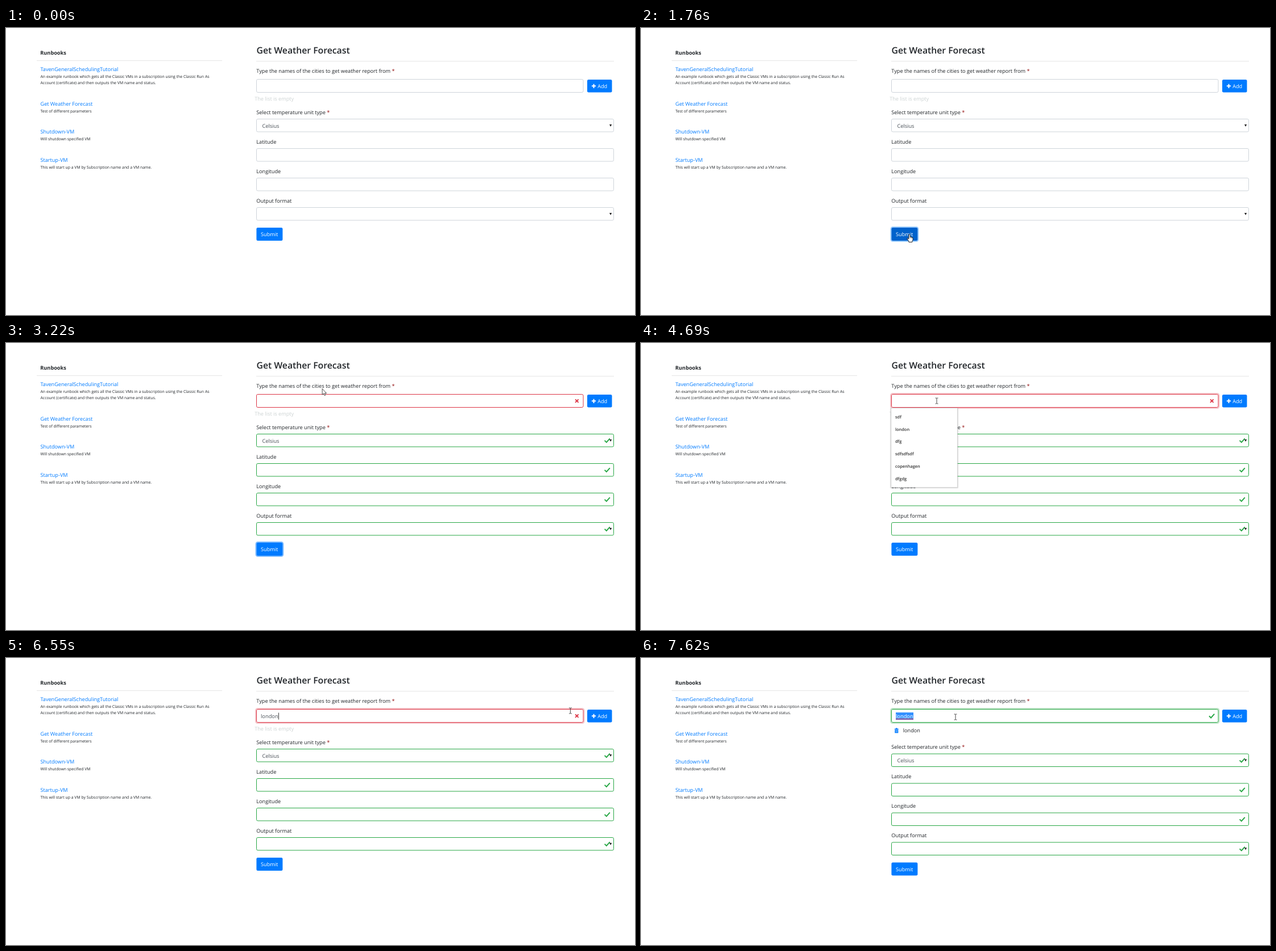
These frames come from a looping animation (1106x506 px, 8 s). An HTML page:

```html
<!DOCTYPE html>
<html lang="en">
<head>
<meta charset="utf-8">
<title>Runbook form</title>
<style>
html, body { margin: 0; width: 100%; height: 100%; overflow: hidden; background: #fff; }
svg { display: block; }
text { font: 9.17px "Open Sans", "Noto Sans", sans-serif; fill: #212529; text-rendering: geometricPrecision; white-space: pre; }
text.title { font-size: 15.75px; font-weight: 600; }
text.head { font-weight: 700; }
text.link { fill: #007bff; font-size: 9.13px; }
text.small { font-size: 6.91px; }
text.value { fill: #495057; }
text.on { fill: #fff; }
text.item { font-size: 7.4px; font-weight: 600; fill: #333; }
.req { fill: #961212; }
.rule { stroke: #e6e6e6; }
.box { fill: #fff; }
.ring { fill: none; stroke-width: 2; }
.tick { fill: none; stroke: #28a745; stroke-width: 2; }
</style>
</head>
<body>
<svg width="1106" height="506" viewBox="0 0 1106 506">
  <path class="rule" d="M54 57.5H380M440 58.5H1069"/>
  <g id="side"></g>
  <text class="title" x="440.5" y="45.3">Get Weather Forecast</text>
  <text x="440.3" y="79.2">Type the names of the cities to get weather report from <tspan class="req">*</tspan></text>

  <rect id="cityRing" class="ring" x="439" y="89" width="577.5" height="26" rx="3.5"/>
  <rect id="city" class="box" x="440.5" y="90.5" width="574.5" height="23" rx="2.3"/>
  <rect id="mark" x="448" y="96" width="31" height="13" fill="#3390ff"/>
  <text id="typed" class="value" x="448" y="106" style="font-size:9.3px"></text>
  <path id="spell" d="M448 107.6H479" stroke="#e0374f" stroke-width="1.1"/>
  <path id="caret" stroke="#222" stroke-width=".9"/>
  <path id="cross" d="M1001 99.3l5.6 5.6m0-5.6l-5.6 5.6" stroke="#dc3545" stroke-width="1.9"/>
  <path id="cityTick" class="tick" d="M999 102.3l3.2 3.2 6-6.8"/>

  <rect id="addRing" class="ring" stroke="#007bff" x="1021" y="90" width="45.5" height="24.5" rx="3.3"/>
  <rect id="add" x="1022" y="91" width="43.5" height="22.5" rx="2.3"/>
  <path d="M1033.5 98.7v7.2m-3.6-3.6h7.2" stroke="#fff" stroke-width="2"/>
  <text class="on" x="1040.2" y="106">Add</text>

  <text id="empty" x="437.2" y="127.7" style="fill:#cdd3d3">The list is empty</text>
  <g id="entry">
    <path d="M445.8 124.8h7v1.2h-7zM447.8 123.5h3v1.3h-3zM446.3 126.6h6v5.6h-6z" fill="#007bff"/>
    <path d="M448 127.7v3.4m1.3-3.4v3.4m1.3-3.4v3.4" stroke="#cfe5ff" stroke-width=".5"/>
    <text x="460.7" y="130.8">london</text>
  </g>

  <g id="lower">
    <g id="fields"></g>
    <rect id="sendRing" class="ring" stroke="#007bff" x="439.5" y="351" width="47.8" height="25" rx="3.3"/>
    <rect id="send" x="440.4" y="352" width="46" height="23" rx="2.3"/>
    <text class="on" x="448" y="367">Submit</text>
  </g>

  <g id="menu"></g>

  <g id="arrow"><path d="M0 0V10.6L2.4 8.4 4.1 12 5.8 11.2 4.2 7.8H7.4Z" fill="#fff" stroke="#222" stroke-width=".8"/></g>
  <g id="hand">
    <path d="M-1.2 8.6V1Q0-.7 1.1 1V4.6Q2.4 3.8 3 5.2 4.2 4.6 4.7 5.8 6 5.4 6.1 7V10L4.9 12.4V14H-1.1V12.5L-4 8.5Q-4.2 6.8-2.7 7.3Z" fill="#fff" stroke="#111" stroke-width=".9"/>
    <path d="M1.1 4.6V7M3 5.2V7.2M4.7 5.8V7.4" stroke="#111" stroke-width=".6"/>
  </g>
  <g id="beam"><path d="M-2.4-5H-.6L0-4.4.6-5H2.4M0-4.4V4.4M-2.4 5H-.6L0 4.4.6 5H2.4" fill="none" stroke="#333" stroke-width=".9"/></g>
</svg>
<script>
const $ = id => document.getElementById(id);
const LOOP = 8000, STEP = 77.13, START = 370;
const BLUE = [0, 123, 255], HOVER = [0, 105, 217], DOWN = [0, 98, 204];
const GREY = [206, 212, 218], RED = [220, 53, 69], GREEN = [40, 167, 69];

const line = (cls, x, y, s) => `<text class="${cls}" x="${x}" y="${y}">${s}</text>`;
const rgb = c => `rgb(${c.map(Math.round)})`;
const mix = (a, b, k) => a.map((v, i) => v + (b[i] - v) * k);
const show = (id, on) => { $(id).style.display = on ? '' : 'none'; };
const within = (t, a, b) => t >= a && t < b;
const ramp = (t, from) => Math.max(0, Math.min(1, (t - from) / 150));

$('side').innerHTML = line('head', 60.3, 46.6, 'Runbooks') + [
  [76, 'TavenGeneralSchedulingTutorial',
    'An example runbook which gets all the Classic VMs in a subscription using the Classic Run As',
    'Account (certificate) and then outputs the VM name and status.'],
  [136.5, 'Get Weather Forecast', 'Test of different parameters'],
  [186, 'Shutdown-VM', 'Will shutdown specified VM'],
  [235.6, 'Startup-VM', 'This will start up a VM by Subscription name and a VM name.']
].map(([y, name, ...notes]) => line('link', 60.5, y, name) +
  notes.map((s, i) => line('small', 60.5, y + 12.1 + 10.9 * i, s)).join('')).join('');

$('fields').innerHTML = [
  ['Select temperature unit type <tspan class="req">*</tspan>', true, 'Celsius'],
  ['Latitude'], ['Longitude'], ['Output format', true]
].map(([label, pick, value], i) => {
  const y = 160.5 + 52 * i;
  return line('', 440.3, y - 8.8, label) +
    `<rect class="box field" x="440.5" y="${y}" width="628" height="22.5" rx="2.3"/>` +
    (value ? line('value', 450.5, y + 15.4, value) : '') +
    `<path class="tick valid" d="M1052.6 ${y + 11.4}l3.2 3.2 6-6.8"/>` +
    (pick ? `<path d="M1061 ${y + 9.4}h4.2l-2.1 4z" fill="#222"/>` : '');
}).join('');

function drawMenu(items) {
  const h = 9.3 + 21.75 * items.length;
  const frame = (grow, opacity) =>
    `<rect x="${439.5 - grow}" y="${115 - grow / 2}" width="${117 + 2 * grow}" height="${h + 1.5 * grow}" rx="${grow}" opacity="${opacity}"/>`;
  return frame(2, .05) + frame(1.2, .08) +
    `<rect x="439.8" y="114.8" width="116.5" height="${h}" fill="#fff" stroke="#c9c9c9" stroke-width=".7"/>` +
    items.map((s, i) => line('item', 447, 132.8 + 21.75 * i, s)).join('');
}
const words = ['sdf', 'london', 'dfg', 'sdfsdfsdf', 'copenhagen', 'dfgdg'];
const menus = { all: drawMenu(words), one: drawMenu(['london']) };
let menuNow = '';

// pointer waypoints: time, x, y
const route = [
  [370, 946, 475], [600, 765, 412], [830, 585, 377], [990, 503, 368], [1140, 475, 364.5], [1220, 472, 363.5],
  [2690, 472, 363.5], [2760, 482, 352], [2912, 575, 262], [3064, 627, 150], [3150, 598, 92], [3220, 556.5, 80.3],
  [3370, 540, 93], [3520, 524, 101], [3750, 520, 102],
  [6020, 520, 102], [6170, 590, 96], [6320, 790, 84], [6480, 960, 88], [6620, 1035, 99.5],
  [6870, 1035, 99.5], [7010, 960, 84], [7160, 780, 83], [7300, 610, 97], [7390, 558, 103], [7470, 553, 104]
];
function pointer(t) {
  const i = route.findIndex(p => p[0] > t);
  if (i < 0) return route[route.length - 1].slice(1);
  if (!i) return route[0].slice(1);
  const [a, b] = [route[i - 1], route[i]];
  return mix(a, b, (t - a[0]) / (b[0] - a[0])).slice(1);
}

// keystroke times and the caret place after each letter
const keys = [4920, 5160, 5320, 5395, 5470, 5630];
const ends = [448.6, 450.8, 456.6, 462.4, 468.2, 473.8, 479.4];

function paintButton(id, hot, down, ring) {
  $(id).setAttribute('fill', rgb(down ? DOWN : hot ? HOVER : BLUE));
  $(id + 'Ring').setAttribute('opacity', ring * .5);
}

function render(t) {
  const k = Math.floor((t - START + 5) / STEP);
  const s = k < 0 ? 0 : START + k * STEP;
  const checked = t >= 1830, added = t >= 6775, focus = within(t, 4140, 6690);
  const shift = added ? 8.5 : 0;
  const [x, y] = pointer(s);
  const over = (l, top, r, bottom) => k >= 0 && x >= l && x <= r && y >= top && y <= bottom;

  const onSend = over(440, 352 + shift, 487, 375 + shift);
  const onAdd = over(1022, 91, 1066, 114);
  const onText = over(440, 90, 1015, 114) || over(440, 212, 1069, 235) || over(440, 264, 1069, 287);
  const kind = onSend || onAdd ? 'hand' : onText ? 'beam' : 'arrow';
  for (const id of ['arrow', 'hand', 'beam']) show(id, k >= 0 && id === kind);
  $(kind).setAttribute('transform', `translate(${x} ${y})`);

  paintButton('send', onSend, within(t, 1680, 1830), ramp(s, 1640) - ramp(s, 4100));
  paintButton('add', onAdd, within(t, 6690, 6845), ramp(s, 6630) - ramp(s, 7420));

  const valid = ramp(s, 1760), fixed = ramp(s, 6765);
  const edge = rgb(mix(mix(GREY, RED, valid), GREEN, fixed));
  $('city').setAttribute('stroke', edge);
  $('cityRing').setAttribute('stroke', edge);
  $('cityRing').setAttribute('opacity', .28 * (ramp(s, 4100) - ramp(s, 6630) + ramp(s, 7420)));
  document.querySelectorAll('.field').forEach(f => f.setAttribute('stroke', rgb(mix(GREY, GREEN, valid))));
  document.querySelectorAll('.valid').forEach(v => { v.style.display = checked ? '' : 'none'; });
  show('cross', checked && !added);
  show('cityTick', added);
  show('empty', !added);
  show('entry', added);
  $('lower').setAttribute('transform', `translate(0 ${shift})`);

  const n = keys.filter(at => t >= at).length;
  const picked = t >= 7615;
  $('typed').textContent = 'london'.slice(0, n);
  $('typed').style.fill = picked ? '#fff' : '';
  show('mark', picked);
  show('spell', t >= 7460);
  show('caret', focus && !within(t, 4690, 4920) || within(t, 7460, 7615));
  $('caret').setAttribute('d', `M${ends[n]} 96.5V108.5`);

  const menu = within(t, 4220, 5000) ? 'all' : within(t, 5000, 5630) ? 'one' : '';
  if (menu !== menuNow) $('menu').innerHTML = menus[menuNow = menu] || '';
}

const begin = performance.now();
function tick() {
  render((performance.now() - begin) % LOOP);
  requestAnimationFrame(tick);
}
tick();
</script>
</body>
</html>
```
